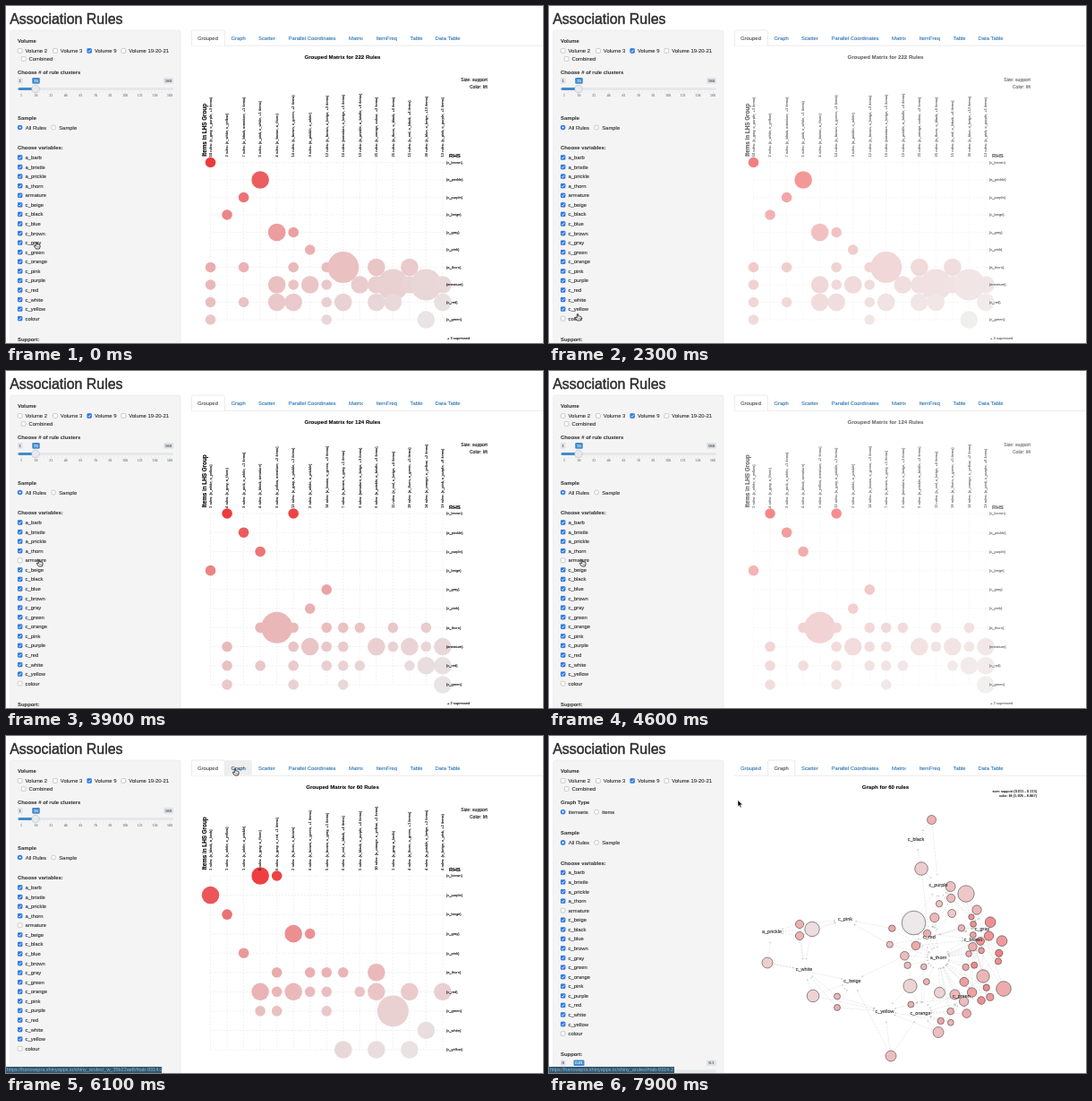
Write an HTML page that moves like this. It is 600 px wide and 376 px high and loops after 8000 ms.

```html
<!DOCTYPE html>
<html lang="en">
<head>
<meta charset="utf-8">
<title>Association Rules</title>
<style>
html, body { margin: 0; width: 100%; height: 100%; overflow: hidden; background: #fff; }
svg { display: block; width: 600px; height: 376px; font-family: "Liberation Sans", Arial, sans-serif; }
</style>
</head>
<body>
<svg id="stage" viewBox="0 0 600 376" xmlns="http://www.w3.org/2000/svg"></svg>
<script>
const LOOP = 8000;
const range = n => [...Array(n).keys()];
const clamp = v => Math.max(0, Math.min(1, v));
const ease = p => p * p * (3 - 2 * p);
function seeded(s) {
  return () => (s = (s * 16807) % 2147483647) / 2147483647;
}

const text = (x, y, s, { size = 5.9, fill = '#333', bold, anchor = 'start', weight = .12, id = '' } = {}) =>
  `<text x="${x}" y="${y}" font-size="${size}" fill="${fill}" stroke="${fill}" stroke-width="${weight}"` +
  ` text-anchor="${anchor}"${bold ? ' font-weight="700"' : ''}${id && ` id="${id}"`}>${s}</text>`;
const rect = (x, y, w, h, fill, attr = '') =>
  `<rect x="${x}" y="${y}" width="${w}" height="${h}" fill="${fill}" ${attr}/>`;
const circle = (x, y, r, fill, attr = '') => `<circle cx="${x}" cy="${y}" r="${r}" fill="${fill}" ${attr}/>`;
const group = (id, body) => `<g id="${id}">${body}</g>`;
const upright = (x, y, s, o) => `<g transform="translate(${x} ${y}) rotate(-90)">${text(0, 0, s, o)}</g>`;
const heading = (y, s) => text(13, y + 1.8, s, { bold: true, weight: .05 });
const plotTitle = s => text(376, 58.5, s, { size: 6.1, bold: true, anchor: 'middle', fill: '#000', weight: .05 });
const note = (x, y, s, size, anchor) => text(x, y, s, { size, anchor, fill: '#111' });
const shade = (lift, pale = 228) => {
  const k = clamp(lift);
  return `rgb(${pale + 5 + 4 * k},${pale - (pale - 56) * k},${pale + 1 - (pale - 57) * k})`;
};

// Sidebar
const emptyBox = (x, y) => rect(x + .25, y - 2.4, 4.8, 4.8, '#fff', 'rx="1" stroke="#9a9a9a" stroke-width=".5"');
const tick = (x, y, id) => group(id, rect(x, y - 2.65, 5.3, 5.3, '#2d7be5', 'rx="1.1"') +
  `<path d="M${x + 1.2} ${y + .1}l1.1 1.2 1.8-2.5" fill="none" stroke="#fff" stroke-width=".8"/>`);
const check = (x, y, s, id) => emptyBox(x, y) + (id ? tick(x, y, id) : '') + text(x + 8.5, y + 2, s);
const radio = (x, y, s, on) => (on
  ? circle(x, y, 2.8, '#2d7be5') + circle(x, y, 1.1, '#fff')
  : circle(x, y, 2.5, '#fff', 'stroke="#9a9a9a" stroke-width=".5"')) + text(x + 6.2, y + 2, s);
const pill = (x, y, w, s, on) => rect(x, y - 3.4, w, 6.6, on ? '#428bca' : '#dfe2e7', 'rx="1.2"') +
  text(x + w / 2, y + 1.6, s, { size: 4.4, fill: on ? '#fff' : '#555', anchor: 'middle' });
function slider(y, lo, now, hi, w) {
  const ticks = range(41).map(i => rect(17 + i * 4.15, y + 3, .3, i % 4 ? 1.2 : 2.2, '#bbb')).join('');
  const nums = range(11).map(i =>
    text(17 + i * 16.6, y + 8.8, i < 10 ? 1 + i * 15 : 160, { size: 3.6, fill: '#888', anchor: 'middle' })).join('');
  return pill(13, y - 9, 5.5, lo) + pill(33.5 - w / 2, y - 9, w, now, true) + pill(176, y - 9, 11, hi) +
    rect(13, y - 1.5, 174, 3, '#e4e7eb', 'rx="1.5"') + rect(13.5, y - 1.5, 19.5, 3, '#428bca', 'rx="1.5"') + ticks + nums +
    circle(33, y, 4.3, '#e6e9ee', 'stroke="#a9b0b8" stroke-width=".5"');
}
const vars = ('a_barb a_bristle a_prickle a_thorn armature c_beige c_black c_blue c_brown c_gray c_green ' +
  'c_orange c_pink c_purple c_red c_white c_yellow colour').split(' ');
const sidebar = rect(4.7, 27, 190.3, 380, '#f5f4f5', 'rx="2" stroke="#e3e3e3" stroke-width=".5"') +
  heading(39.5, 'Volume') + check(13, 50, 'Volume 2') + check(52.3, 50, 'Volume 3') +
  check(90.5, 50, 'Volume 9', 'volume9') + check(128.7, 50, 'Volume 19-20-21') + check(17, 59, 'Combined') +
  group('clusters', heading(74, 'Choose # of rule clusters') + slider(92.5, '1', '15', '160', 8.5)) +
  group('type', heading(74, 'Graph Type') + radio(15.6, 84.7, 'itemsets', true) + radio(53, 84.7, 'items')) +
  group('lower', heading(124.8, 'Sample') + radio(15.6, 135.5, 'All Rules', true) + radio(53, 135.5, 'Sample') +
    heading(158.5, 'Choose variables:') +
    vars.map((v, i) => check(13, 169 + i * 10.57, v, 'on_' + v)).join('') +
    heading(371.7, 'Support:') + slider(390.5, '0', '0.01', '0.1', 12));

// Tabs
const tabs = { Grouped: 214, Graph: 251.5, Scatter: 282, 'Parallel Coordinates': 315.5,
  Matrix: 383, ItemFreq: 413.5, Table: 451.5, 'Data Table': 479.5 };
const tabFrame = (id, x, w) => `<path id="${id}" d="M${x} 44.3v-15.3q0-2 2-2h${w - 4}q2 0 2 2v15.3" ` +
  'fill="#fff" stroke="#ddd" stroke-width=".6"/>';
const tabBar = rect(207, 43.8, 393, .6, '#ddd') + rect(244.3, 27, 30.5, 16.8, '#eee', 'id="hover" rx="2"') +
  tabFrame('frame0', 207.3, 37) + tabFrame('frame1', 244.6, 30.2) +
  Object.entries(tabs).map(([s, x], i) => text(x, 37.6, s, { fill: '#337ab7', id: 'tab' + i })).join('');

// Grouped matrices. In rows a letter names the column: a small, A large, A* huge bubble.
const plots = [{
  id: 'm222', rules: 222, top: 174.5, more: 3,
  names: 'c_brown a_prickle c_purple c_beige c_gray c_pink a_thorn armature c_red c_green',
  rows: 'a D c b Ef g acfhI*KM aEfGhJKL*MN*O acEFhIKLO ahN',
  cols: '10 c_gray,c_purple,3|2 c_white,c_yellow|7 c_black,armature,1|5 c_pink,c_white,1|4 c_brown,a_thorn|' +
    '14 c_brown,c_green,2|3 a_prickle,c_white|12 c_brown,c_beige,3|16 armature,c_beige,5|19 a_prickle,a_bristle,6|' +
    '25 c_orange,colour,3|25 a_thorn,c_black,6|15 c_red,c_black,4|36 c_blue,c_beige,13|13 c_pink,c_purple,5'
}, {
  id: 'm124', rules: 124, top: 159, more: 2,
  names: 'c_brown a_prickle c_purple c_beige c_gray c_pink a_thorn armature c_red c_green',
  rows: 'bf c d a h g dE*fhijln bfGhiKlMnO bdfhijmNO bfiO',
  cols: '1 c_white,c_yellow|4 c_gray,a_thorn|3 c_pink,c_white,1|4 c_black,armature|3 c_yellow,armature,2|' +
    '12 c_gray,a_prickle,2|2 c_white,a_prickle|14 c_brown,c_green,3|7 c_brown,c_gray,1|9 armature,c_beige,3|' +
    '9 a_prickle,a_bristle,3|11 c_red,c_beige,4|18 a_thorn,c_green,5|14 c_orange,c_yellow,2|13 c_pink,c_purple,8'
}, {
  id: 'm60', rules: 60, top: 156, more: 0,
  names: 'c_brown c_purple c_beige c_gray c_pink a_thorn c_red c_green c_white c_yellow',
  rows: 'De A b Fg c eghiK DeFghjKMO dehL* N IKM',
  cols: '1 c_black,a_barb|1 c_white,c_yellow|1 c_white,a_prickle|5 c_gray,a_thorn|6 c_gray,c_red,1|2 a_thorn,c_brown|' +
    '6 c_brown,c_green,1|5 c_brown,c_gray,1|6 c_red,c_black,4|5 c_black,c_purple,4|10 c_orange,c_yellow,2|' +
    '1 c_gray,a_barb|4 a_thorn,c_green,1|4 a_prickle,c_beige,2|4 c_beige,c_pink,2'
}];
const colX = i => 228.5 + 18.53 * i;
function matrix(p) {
  const rowY = j => p.top + (350 - p.top) / 9 * j;
  const base = p.top - 6;
  let out = `<path fill="none" stroke="#d8d8d8" stroke-width=".4" stroke-dasharray="2 1.6" d="` +
    range(15).map(i => `M${colX(i)} ${p.top}V${rowY(9)}`).join('') +
    range(10).map(j => `M${colX(0)} ${rowY(j)}H491`).join('') + '"/>';
  p.rows.split(' ').forEach((row, j) => {
    for (const cell of row.match(/\w\*?/g)) {
      const i = parseInt(cell[0], 36) - 10;
      const r = cell[1] ? 17.5 : cell < 'a' ? 9.8 : 5.8;
      out += circle(colX(i), rowY(j), r, shade(Math.exp(-.19 * j) - .014 * i));
    }
  });
  p.cols.split('|').forEach((c, i) => {
    const [count, items] = c.split(' '), [a, b, more] = items.split(',');
    out += upright(colX(i) + 1.3, base, `${count} rules: {${a}, ${b}${more ? `, +${more} items` : ''}}`,
      { size: 4.05, fill: '#111' });
  });
  p.names.split(' ').forEach((s, j) => out += note(492, rowY(j) + 1.3, `{${s}}`, 4));
  return group(p.id, out + plotTitle(`Grouped Matrix for ${p.rules} Rules`) +
    note(538, 84.4, 'Size: support', 5.1, 'end') + note(538, 92.2, 'Color: lift', 5.1, 'end') +
    upright(224, base - .8, 'Items in LHS Group', { size: 6.3, bold: true, fill: '#000' }) +
    text(495, base + .8, 'RHS', { size: 6.1, bold: true, fill: '#000' }) +
    (p.more ? note(493, 372.3, `+ ${p.more} supressed`, 4) : ''));
}

// Rule graph: item labels, a few main nodes, and a seeded cloud around the hub
const tags = { c_black: [410, 115], c_purple: [435, 166.5], c_pink: [331, 204.5], a_prickle: [249, 218.5],
  c_white: [285, 260.5], c_beige: [339, 273.5], c_yellow: [375, 307], c_orange: [415, 309], c_green: [461, 290],
  c_red: [425, 224.5], c_brown: [474, 227], c_gray: [484, 215.5], a_thorn: [435, 247.5] };
const mainNodes = [[427.5, 93.5, 5], [416, 148, 7.3], [294, 215.5, 8.2], [280, 210, 4.6], [280, 223, 4.6], [244, 253, 6],
  [295, 290, 6.8], [322, 290.5, 3.5], [322, 303, 3.5], [407.5, 208.5, 13.3], [466, 176, 9.2], [508, 282, 8.3],
  [382, 357, 6], [435, 330.5, 6], [403.5, 279, 7.6], [485, 268, 7.2], [491.5, 223, 5.2], [478, 194, 5.2]];
function cloud(rnd) {
  const nodes = [...mainNodes];
  while (nodes.length < 58) {
    const a = rnd() * 2 * Math.PI, d = .4 + .6 * rnd(), r = 3.2 + 2.8 * rnd();
    const x = 443 + 64 * d * Math.cos(a), y = 242 + 80 * d * Math.sin(a);
    if (nodes.every(n => Math.hypot(n[0] - x, n[1] - y) > n[2] + r + 1)) nodes.push([x, y, r]);
  }
  return nodes;
}
function ruleGraph() {
  const rnd = seeded(60), places = Object.values(tags);
  let links = '', dots = '';
  for (const [x, y, r] of cloud(rnd)) {
    const far = q => Math.hypot(q[0] - x, q[1] - y);
    for (const q of [...places].sort((a, b) => far(a) - far(b)).slice(0, 3)) {
      const d = far(q), k = Math.max(.3, 1 - 11 / d);
      if (d < 105) links += `<path d="M${x} ${y}L${x + (q[0] - x) * k} ${y + (q[1] - y) * k}" marker-end="url(#tip)"/>`;
    }
    const lift = .38 - .045 * r + .2 * rnd() + Math.max(0, x - 450) / 200;
    dots += circle(x, y, r, shade(lift, 232), 'stroke="#444" stroke-width=".6"');
  }
  const names = Object.entries(tags).map(([s, [x, y]]) => text(x, y + 1.8, s, { size: 5.5, anchor: 'middle' })).join('');
  return group('graph', '<defs><marker id="tip" markerUnits="userSpaceOnUse" markerWidth="3" markerHeight="3" ' +
    'refX="2" refY="1" orient="auto"><path d="M0 0L2 1 0 2z" fill="#c4c4c4"/></marker></defs>' +
    `<g stroke="#cfcfcf" stroke-width=".4" stroke-dasharray="2.5 1">${links}</g>${dots}${names}` +
    plotTitle('Graph for 60 rules') +
    note(545, 63, 'size: support (0.011 - 0.113)', 4, 'end') + note(545, 68.2, 'color: lift (1.925 - 8.967)', 4, 'end'));
}

const link = (id, w, path) => group(id, rect(0, 369, w, 7, '#34586f') +
  text(.8, 374.3, `https://hanovepra.shinyapps.io/shiny_arules/${path}#tab-9314-2`, { size: 5.5, fill: '#86b9db', weight: 0 }));
const arrow = '<path d="M0 0V7.2L1.7 5.7 2.9 8.4 4.1 7.9 2.9 5.3H5.2z" fill="#000" stroke="#fff" stroke-width=".5"/>';
const hand = '<g transform="translate(0 -.6) scale(.88)">' +
  '<path d="M-.8.5Q0-.6.8.5V3.2Q1.6 2.5 2.2 3.3 3 2.8 3.5 3.6 4.6 3.3 4.6 4.5V6.2L3.7 8.6H-.6L-3 5.2Q-3.2 4-1.9 4.4L-.8 5.4z" ' +
  'fill="#fff" stroke="#111" stroke-width=".9"/><path d="M.8 5.2V7M2 5.2V7M3.2 5.2V7" stroke="#333" stroke-width=".5"/></g>';

const stage = document.getElementById('stage');
stage.innerHTML = rect(0, 0, 600, 376, '#fff') +
  text(4.2, 20.2, 'Association Rules', { size: 15.9, fill: '#2c2c2c', weight: .45 }) +
  sidebar + tabBar + plots.map(matrix).join('') + ruleGraph() +
  link('longLink', 174, '_w_35b22ae8/') + link('shortLink', 140, '') +
  group('cursor', group('arrow', arrow) + group('hand', hand));

const el = id => document.getElementById(id);
const show = (id, on) => el(id).setAttribute('display', on ? 'inline' : 'none');
const paint = (id, color) => ['fill', 'stroke'].forEach(a => el(id).setAttribute(a, color));

// Pointer stops: time, x, y
const path = [[0, 34, 264], [1000, 31, 336], [1200, 31, 336], [1500, 32, 344], [2700, 32, 344], [3000, 34.7, 288],
  [3700, 37, 211], [5400, 37, 211], [6000, 256, 37], [6900, 256, 37], [7400, 211, 71.5], [LOOP, 211, 71.5]];
function pointer(t) {
  const i = path.findIndex((p, k) => k && t <= p[0]), a = path[i - 1], b = path[i];
  const k = ease((t - a[0]) / (b[0] - a[0]));
  return [a[1] + (b[1] - a[1]) * k, a[2] + (b[2] - a[2]) * k];
}
// Stale output dims to 30% over a quarter second
const dim = (t, from) => 1 - .7 * ease(Math.pow(clamp((t - from) / 250), .75));

function draw(t) {
  const onGraph = t >= 6200, graphSide = t >= 6350, overTab = t >= 5950;
  show('on_colour', t < 1600);
  show('on_armature', t < 3900);
  show('m222', t < 2650);
  show('m124', t >= 2650 && t < 5400);
  show('m60', t >= 5400 && !onGraph);
  show('graph', t >= 6900);
  el('m222').setAttribute('opacity', dim(t, 2200));
  el('m124').setAttribute('opacity', dim(t, 4490));
  show('clusters', !graphSide);
  show('type', graphSide);
  el('lower').setAttribute('transform', `translate(0 ${graphSide ? -16.6 : 0})`);
  show('hover', overTab && !onGraph);
  show('frame0', !onGraph);
  show('frame1', onGraph);
  paint('tab0', onGraph ? '#337ab7' : '#555');
  paint('tab1', onGraph ? '#555' : overTab ? '#23527c' : '#337ab7');
  show('longLink', overTab && !graphSide);
  show('shortLink', graphSide);
  const [x, y] = pointer(t);
  const plain = (t > 2750 && t < 3500) || (t > 5450 && !overTab) || t >= 6950;
  el('cursor').setAttribute('transform', `translate(${x} ${y})`);
  show('arrow', plain);
  show('hand', !plain);
}

const start = performance.now();
function play() {
  draw((performance.now() - start) % LOOP);
  requestAnimationFrame(play);
}
play();
</script>
</body>
</html>
```
